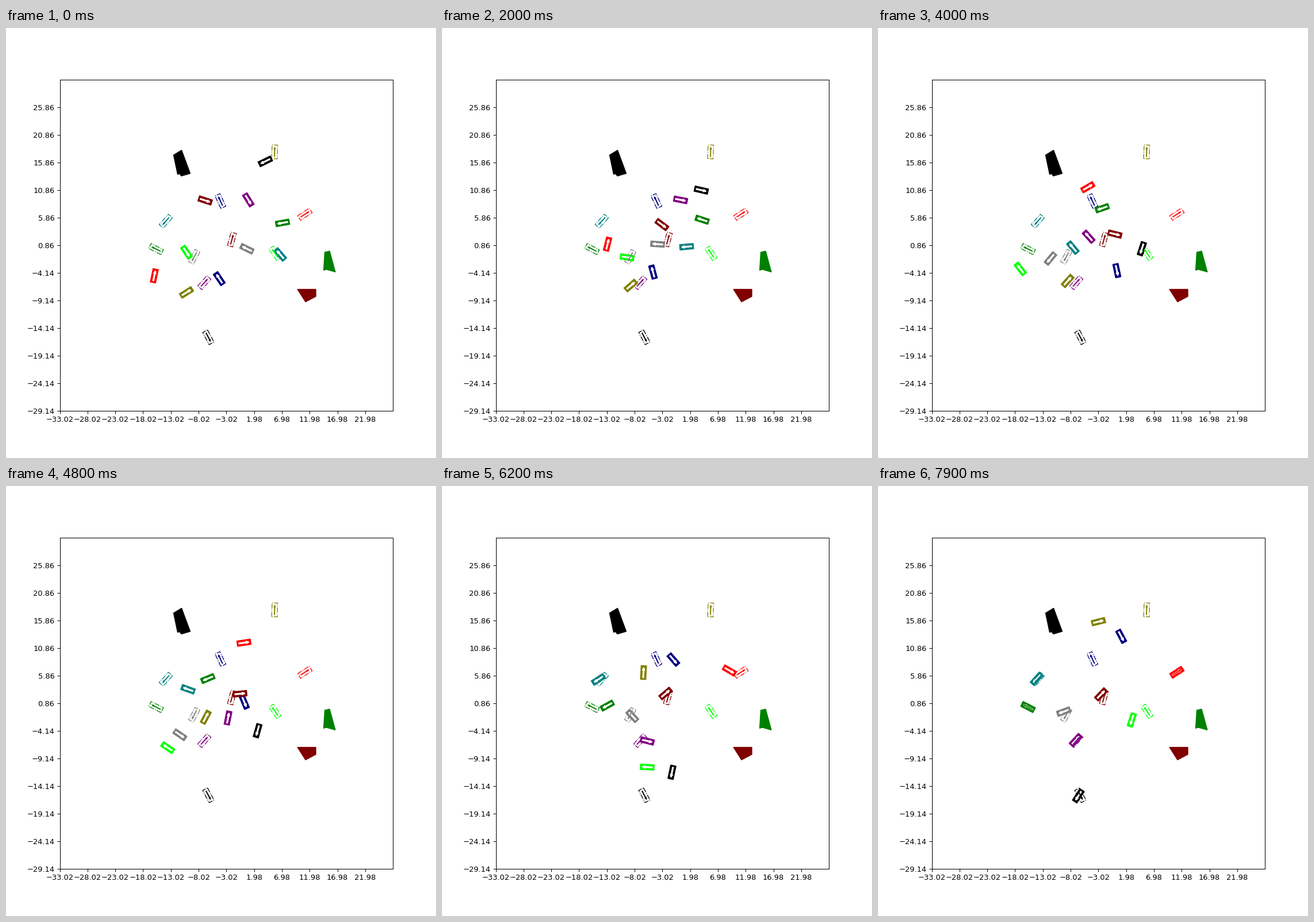
Animation of 748x748 px, one loop 8000 ms. Source, as a matplotlib script:

```python
import numpy as np
import matplotlib.pyplot as plt
from matplotlib.animation import FuncAnimation
from matplotlib.patches import FancyArrow, Polygon, Rectangle
from matplotlib.transforms import Affine2D

SIZE = 748
FRAMES, STEP = 80, 100
LENGTH, WIDTH = 24.0, 9.6
TIMES = [1, 20, 40, 62, 79]  # frames at which each car reaches its next pose

fig = plt.figure(figsize=(8, 8), dpi=SIZE / 8)
ax = fig.add_subplot()
X0, Y0 = -33.02, -29.14
ax.set_xlim(X0, X0 + 60)
ax.set_ylim(Y0, Y0 + 60)


def ticks(start):
    values = start + 5 * np.arange(12)
    return values, [f"{v:.2f}".replace("-", "\u2212") for v in values]


ax.set_xticks(*ticks(X0))
ax.set_yticks(*ticks(Y0))

# stage pixels, y pointing down
stage = Affine2D().scale(1 / SIZE, -1 / SIZE).translate(0, 1) + fig.transFigure


def place(parts, x, y, heading):
    pose = Affine2D().rotate_deg(-heading).translate(x, y) + stage
    for part in parts:
        part.set_transform(pose)


def body(**style):
    return ax.add_patch(Rectangle((-LENGTH / 2, -WIDTH / 2), LENGTH, WIDTH, **style))


def arrow(color, lw, zorder):
    return ax.add_patch(FancyArrow(
        -8.5, 0, 17, 0, width=1, head_width=3, head_length=4,
        length_includes_head=True, color=color, lw=lw, zorder=zorder))


def obstacle(color, *points):
    ax.add_patch(Polygon(points, color=color, lw=1, transform=stage))


class Car:
    """Drives arcs from pose to pose (x, y, heading) and may end on its goal."""

    def __init__(self, color, goal, *poses, gear=1):
        place([body(fill=False, ec=color, lw=1, ls="-.", zorder=2),
               arrow(color, 0.7, 4)], *goal)
        if len(poses) < len(TIMES):
            poses += (goal,)
        self.poses = np.array(poses, float)
        self.gear = gear
        self.parts = [body(fc=color, ec=color, lw=1, zorder=3), arrow("white", 1.7, 3)]

    def move(self, k):
        k = max(k, TIMES[0])
        i = min(np.searchsorted(TIMES, k, side="right"), len(TIMES) - 1) - 1
        u = (k - TIMES[i]) / (TIMES[i + 1] - TIMES[i])
        if i == 0:
            u *= u  # speed up from rest
        a, b = self.poses[i], self.poses[i + 1]
        heading = a[2] + (b[2] - a[2]) * u
        place(self.parts, *self.arc(a, b, u), heading)

    def arc(self, a, b, u):
        # cubic whose tangents fit a circle turning from one heading to the other
        h0, h1 = np.radians([a[2], b[2]])
        chord = b[:2] - a[:2]
        pull = self.gear * np.hypot(*chord) / np.cos((h1 - h0) / 4) ** 2
        t0 = pull * np.array([np.cos(h0), -np.sin(h0)])
        t1 = pull * np.array([np.cos(h1), -np.sin(h1)])
        return (a[:2] + chord * u * u * (3 - 2 * u)
                + t0 * u * (1 - u) ** 2 - t1 * u * u * (1 - u))


obstacle("black", (291.5, 221), (305.5, 212.5), (320.5, 253), (305, 257.5),
         (302, 253.5), (298.5, 254.5))
obstacle("green", (554.5, 390), (563, 388), (573, 424.5), (557, 420), (552.5, 421.5))
obstacle("maroon", (507, 454.5), (539, 454.5), (539, 467), (521, 476.5))

cars = [
    Car("red", (520, 324, 33), (258, 431, 78), (288, 376, 76),
        (365, 277, 30), (500, 321, -30)),
    Car("green", (261, 384.5, 153), (481, 339, 190), (452.5, 333.5, 162),
        (390, 313.5, 199), (287.5, 382, 209)),
    Car("navy", (373, 301, 115), (371, 436, 124), (367, 424.5, 105),
        (415.5, 422, 282), (402.5, 302, 311), (423, 261.5, 298), gear=-1),
    Car("maroon", (393, 368, 75), (346.5, 300, -18), (382.5, 342, -37),
        (412, 358.5, -14), (389, 361, 40), (388, 362.5, 46)),
    Car("purple", (345, 443, 48), (421.5, 299, -58), (415, 299, -11),
        (366.5, 363, 132), (357, 443.5, -14), (344, 442, 47), gear=-1),
    Car("gray", (327.5, 398, 242), (419, 384, 154), (375, 376, 176),
        (300, 401, 230), (331, 400, 493), (323, 392.5, 560)),
    Car("black", (352, 538, -62), (451, 232, 206), (451, 282, 347),
        (459, 384, 252), (400, 498, 258), (348.5, 539, 237)),
    Car("olive", (467.3, 215.5, 88), (314, 460, 32), (328.5, 448, 41),
        (330, 440, 48), (350.5, 324.5, 87), (383.5, 236, 14)),
    Car("teal", (278, 336, 228), (477, 394, 131), (425.5, 380.5, 185),
        (339, 382, 130), (272, 336.5, 213), (276, 335.5, 228)),
    Car("lime", (468, 392, 124), (314, 390, -56), (322, 399, -9),
        (247.5, 419, 128), (357, 489, 177), (441.5, 407, 252), gear=-1),
]


def draw(k):
    for car in cars:
        car.move(k)
    return [part for car in cars for part in car.parts]


anim = FuncAnimation(fig, draw, frames=FRAMES, interval=STEP, repeat=True, repeat_delay=0)
plt.show()
```
